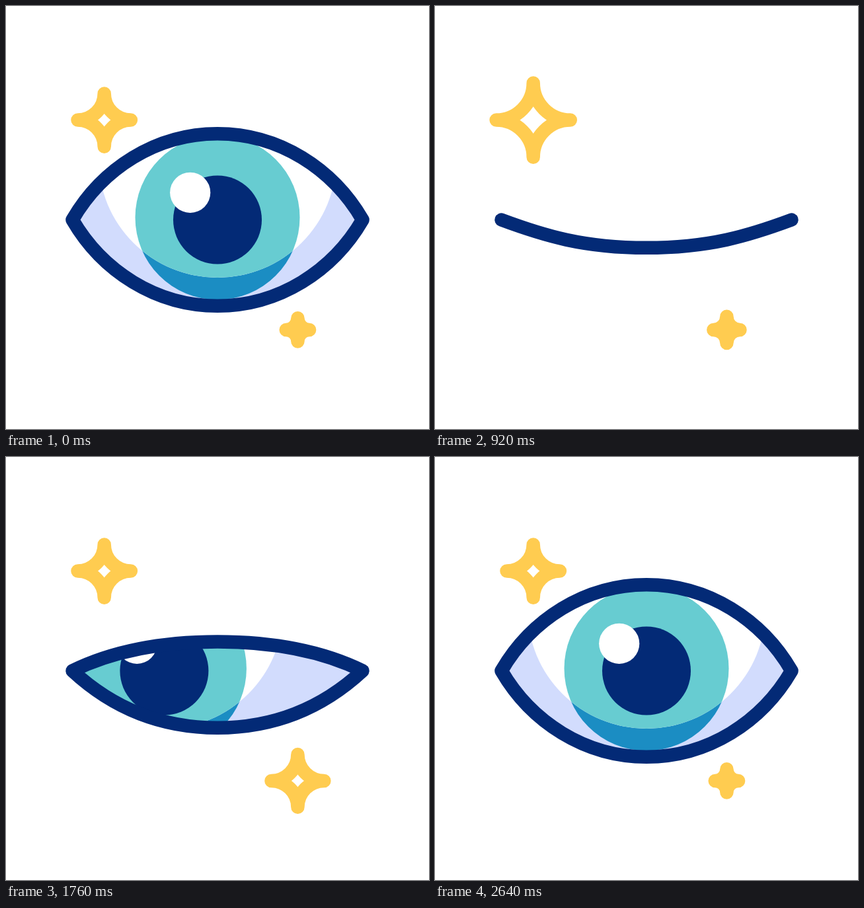
Write an HTML page with a canvas that moves like this. It is 640 by 640 pixels and loops after 3 s.

```html
<!DOCTYPE html>
<html lang="en">
<head>
<meta charset="utf-8">
<title>Blinking eye</title>
<style>
  html, body { margin: 0; width: 100%; height: 100%; overflow: hidden; background: #fff; }
  canvas { display: block; width: 100vmin; height: 100vmin; }
</style>
</head>
<body>
<canvas id="stage" width="640" height="640"></canvas>
<script>
const ctx = document.getElementById('stage').getContext('2d');
const LOOP = 3000;
const STEP = 40;
const LINE = 20.5;
const NAVY = '#032a76', YELLOW = '#ffcc50', TEAL = '#67ccd1', BLUE = '#1b8dc3', LAVENDER = '#d2dcfd';

const mix = (a, b, k) => a + (b - a) * k;

// Smooth 0..1 ramp between two times
function ramp(t, start, end) {
  const x = Math.min(1, Math.max(0, (t - start) / (end - start)));
  return x * x * (3 - 2 * x);
}

const pulse = (t, start) => ramp(t, start, start + 400) - ramp(t, start + 400, start + 800);
const blink = (t, start) => ramp(t, start, start + 400) - ramp(t, start + 480, start + 880);

function gaze(t) {
  return 80.6 * (ramp(t, 233, 583) - 2 * ramp(t, 1210, 1560) + ramp(t, 2275, 2635));
}

function disc(x, y, r, color) {
  ctx.beginPath();
  ctx.arc(x, y, r, 0, Math.PI * 2);
  ctx.fillStyle = color;
  ctx.fill();
}

function outline(path, color) {
  ctx.lineWidth = LINE;
  ctx.lineJoin = ctx.lineCap = 'round';
  ctx.strokeStyle = color;
  ctx.stroke(path);
}

// Four-pointed star made of quarter circles
function star(x, y, size) {
  const path = new Path2D();
  const quarter = Math.PI / 2;
  path.moveTo(x, y - size);
  path.arc(x + size, y - size, size, 2 * quarter, quarter, true);
  path.arc(x + size, y + size, size, 3 * quarter, 2 * quarter, true);
  path.arc(x - size, y + size, size, 4 * quarter, 3 * quarter, true);
  path.arc(x - size, y - size, size, quarter, 0, true);
  path.closePath();
  outline(path, YELLOW);
}

// Each lid blends from its open arc (side -1 upper, 1 lower) to the shared closed line
function lidShape(closed) {
  const path = new Path2D();
  const lid = side => ({
    x1: mix(145.5, 165, closed), y1: mix(323.5 + side * 77.5, 347.5, closed),
    x2: mix(227, 225, closed), y2: mix(323.5 + side * 130.2, 365.8, closed)
  });
  const up = lid(-1), low = lid(1);
  path.moveTo(100.5, 323.5);
  path.bezierCurveTo(up.x1, up.y1, up.x2, up.y2, 320, up.y2);
  path.bezierCurveTo(640 - up.x2, up.y2, 640 - up.x1, up.y1, 539.5, 323.5);
  path.bezierCurveTo(640 - low.x1, low.y1, 640 - low.x2, low.y2, 320, low.y2);
  path.bezierCurveTo(low.x2, low.y2, low.x1, low.y1, 100.5, 323.5);
  path.closePath();
  return path;
}

function eye(closed, shift) {
  const lids = lidShape(closed);
  const x = 320 + shift;
  if (closed < 1) {
    ctx.save();
    ctx.clip(lids);
    ctx.fillStyle = LAVENDER;
    ctx.fillRect(80, 170, 480, 310);
    disc(x, 320, 124.5, BLUE);
    disc(x, 231, 180, '#fff');
    ctx.save();
    ctx.beginPath();
    ctx.arc(x, 231, 180, 0, Math.PI * 2);
    ctx.clip();
    disc(x, 320, 124.5, TEAL);
    ctx.restore();
    disc(x, 323.5, 67, NAVY);
    disc(x - 41.3, 282.3, 30.6, '#fff');
    ctx.restore();
  }
  outline(lids, NAVY);
}

function draw(now) {
  const t = Math.floor((now % LOOP) / STEP) * STEP;
  ctx.fillStyle = '#fff';
  ctx.fillRect(0, 0, 640, 640);
  eye(blink(t, 520) + blink(t, 1560), gaze(t));
  star(148.7, 172.6, 40.2 + 17.7 * (pulse(t, 600) + pulse(t, 1800)));
  star(441.4, 489.9, 17.7 + 22.9 * (pulse(t, 200) + pulse(t, 1400)));
}

let origin;
function tick(now) {
  origin ??= now;
  draw(now - origin);
  requestAnimationFrame(tick);
}
draw(0);
requestAnimationFrame(tick);
</script>
</body>
</html>
```
